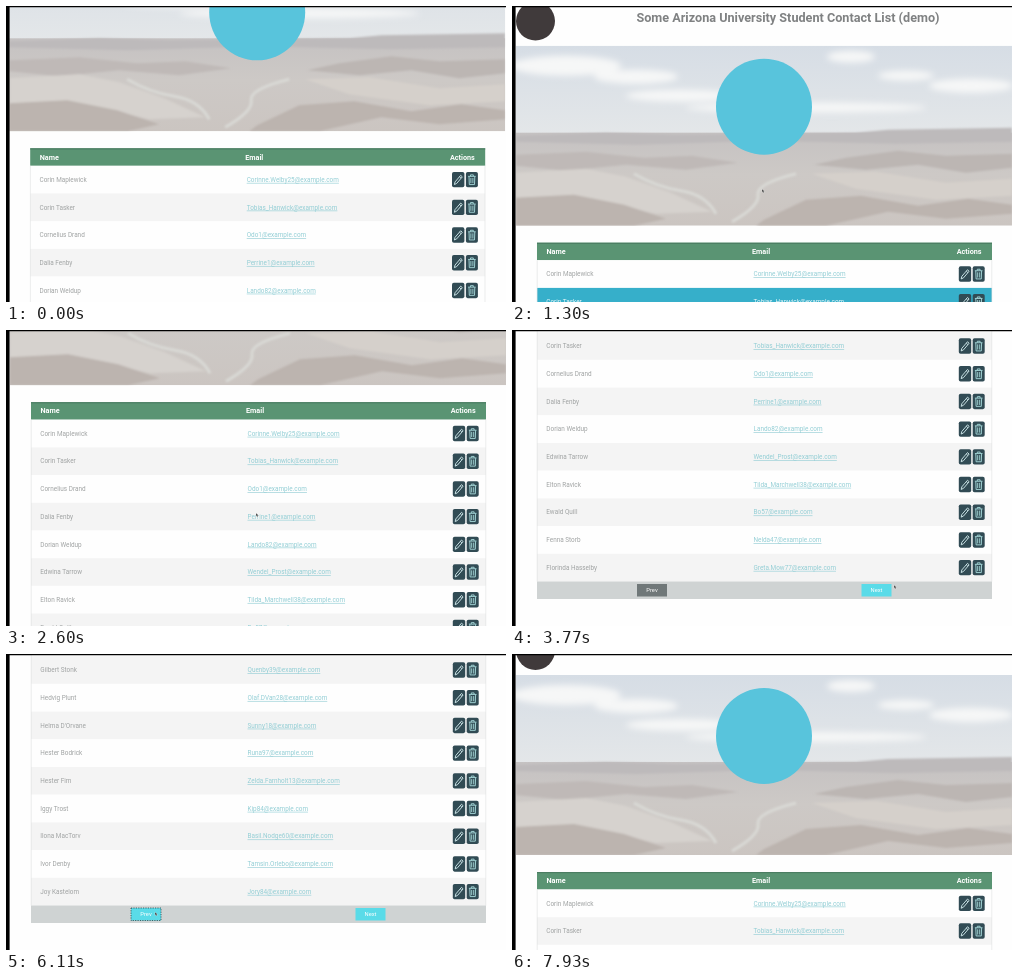
An HTML page for the animation above (8 s loop, 500x296 px).

```html
<!DOCTYPE html>
<html lang="en">
<head>
<meta charset="utf-8">
<title>Contact list</title>
<style>
  html, body { margin: 0; width: 100%; height: 100%; overflow: hidden; background: #fefefe; }
  svg { display: block; width: 100vw; height: 100vh; font-family: Roboto, sans-serif; }
  .title { font: 700 12.65px Roboto, sans-serif; fill: #7f8182; }
  .head { font: 700 7.25px Roboto, sans-serif; fill: #fff; }
  .row { font-size: 6.4px; fill: #a0a3a3; }
  .mail { fill: #93ced5; text-decoration: underline; }
  .hover > rect { fill: #36afca; }
  .hover > text { fill: #e6f6f9; }
  .button { font-size: 5.8px; fill: #fff; text-anchor: middle; }
</style>
</head>
<body>
<svg viewBox="0 0 500 296" preserveAspectRatio="none">
  <defs>
    <linearGradient id="sky" x2="0" y2="1">
      <stop stop-color="#d6dde5"/><stop offset="1" stop-color="#e4e7e9"/>
    </linearGradient>
    <linearGradient id="land" x2="0" y2="1">
      <stop stop-color="#c5c2c2"/><stop offset=".45" stop-color="#cdc9c6"/><stop offset="1" stop-color="#cbc5c1"/>
    </linearGradient>
    <filter id="soft" x="-20%" y="-50%" width="140%" height="200%"><feGaussianBlur stdDeviation="3"/></filter>
    <filter id="haze"><feGaussianBlur stdDeviation="1"/></filter>
    <clipPath id="frame"><path d="M0 0H496V180H0Z"/></clipPath>
    <g id="icons">
      <rect width="12.4" height="15.4" rx="1.8" fill="#314b54"/>
      <rect x="13.9" width="12" height="15.4" rx="1.8" fill="#314b54"/>
      <g fill="none" stroke="#d5eef0" stroke-width=".9">
        <path d="M2.4 12.6L3 10L8.7 3.4L10.3 4.9L4.7 11.5ZM7.5 4.8L9.1 6.3"/>
        <path stroke="#a9dcdd" d="M16.1 4.4H23.7M18.5 4.2V2.9H21.3V4.2M17 4.6L17.3 12.6H22.5L22.8 4.6M18.9 6V11.2M20.9 6V11.2"/>
      </g>
    </g>
  </defs>

  <rect width="500" height="296" fill="#fefefe"/>

  <!-- Everything scrolled hangs from the top edge of the table -->
  <g id="page">
    <circle cx="23.5" cy="-221.6" r="19.5" fill="#403a3b"/>
    <text class="title" x="276" y="-221.2" text-anchor="middle">Some Arizona University Student Contact List (demo)</text>

    <g transform="translate(4 -197)" clip-path="url(#frame)">
      <rect width="496" height="90" fill="url(#sky)"/>
      <g fill="#f6f7f7" filter="url(#soft)">
        <ellipse cx="50" cy="20" rx="55" ry="10"/>
        <ellipse cx="120" cy="31" rx="42" ry="7"/>
        <ellipse cx="165" cy="50" rx="55" ry="6"/>
        <ellipse cx="335" cy="11" rx="24" ry="6"/>
        <ellipse cx="390" cy="30" rx="28" ry="5"/>
        <ellipse cx="455" cy="40" rx="42" ry="7"/>
        <ellipse cx="290" cy="62" rx="120" ry="5"/>
      </g>
      <rect y="87" width="496" height="93" fill="url(#land)"/>
      <g filter="url(#haze)">
        <path fill="#bdbabb" d="M0 90L90 87L160 89L340 87L372 84L496 82V96L380 98L250 95L120 99L0 96Z"/>
        <path fill="#bfb9b7" d="M0 109L70 106L128 112L176 110L222 117L170 124L110 119L50 125L0 120Z"/>
        <path fill="#bcb6b3" d="M496 108L430 110L382 105L330 112L298 119L350 124L402 119L450 127L496 122Z"/>
        <path fill="#d6d2ce" d="M0 127L70 123L110 131L155 147L196 166L140 168L70 152L0 154Z"/>
        <path fill="#bcb4af" d="M0 152L58 149L108 159L150 173L118 180H0Z"/>
        <path fill="#d5d0cb" d="M296 128L360 126L430 137L496 133V150L420 154L340 143Z"/>
        <path fill="#bcb4af" d="M248 174L290 154L345 150L402 160L452 153L496 159V168L430 173L372 166L310 180H240Z"/>
        <path fill="none" stroke="#d9d9d5" stroke-width="3" d="M118 128Q140 141 165 145T200 168M280 128Q240 138 242 149T216 176"/>
      </g>
    </g>
    <circle cx="252" cy="-136" r="48" fill="#58c4dc"/>

    <rect x="25" width="455" height="17.5" fill="#5a9473"/>
    <rect x="25" width="455" height="1.2" fill="#4b7d62"/>
    <g class="head">
      <text x="34.5" y="11.3">Name</text>
      <text x="240" y="11.3">Email</text>
      <text x="444.7" y="11.3">Actions</text>
    </g>
    <g id="lists"></g>
    <path d="M25.2 17.5V294.5M479.8 17.5V294.5" stroke="#dfe1e1" stroke-width=".6"/>
    <rect x="25" y="294.5" width="455" height="17.5" fill="#cfd3d3"/>
    <g class="button">
      <rect id="prev" x="125" y="297" width="30" height="12.5"/>
      <rect x="349.5" y="297" width="30" height="12.5" fill="#5adbe8"/>
      <text x="140" y="305.3">Prev</text>
      <text x="364.5" y="305.3">Next</text>
      <rect id="focus" x="125" y="297" width="30" height="12.5" fill="none" stroke="#26464b" stroke-width=".8" stroke-dasharray="1.2 1.2"/>
    </g>
  </g>

  <path id="cursor" d="M0 0V3.4L.9 2.7L1.5 3.9L2.1 3.6L1.6 2.5H2.6Z" fill="#333" stroke="#fff" stroke-width=".3"/>
  <path d="M0 0H500V1.2H3.6V296H0Z"/>
</svg>
<script>
const LOOP = 8000, STEP = 130, ROW = 27.7;
const $ = id => document.getElementById(id);

// name, mailbox
const people = [
  "Corin Maplewick,Corinne.Welby25", "Corin Tasker,Tobias_Hanwick", "Cornelius Drand,Odo1",
  "Dalia Fenby,Perrine1", "Dorian Weldup,Lando82", "Edwina Tarrow,Wendel_Prost",
  "Elton Ravick,Tilda_Marchwell38", "Ewald Quill,Bo57", "Fenna Storb,Nelda47",
  "Florinda Hasselby,Greta.Mow77",
  "Gerda Wimple,Lorin12", "Gilbert Stonk,Quenby39", "Hedvig Plunt,Olaf.DVan28",
  "Helma D'Orvane,Sunny18", "Hester Bodrick,Runa97", "Hester Fim,Zelda.Farnholt13",
  "Iggy Trost,Kip84", "Ilona MacTorv,Basil.Nodge60", "Ivor Denby,Tamsin.Orlebo",
  "Joy Kastelom,Jory84",
  "Judith Parvel,Mirka_Dun4", "Kasimir Hobbin,Ottoline61", "Kerstin Vade,Pella.Rusk",
  "Lambert Ossing,Tove19", "Leopold Crimmel,Ursel_Banting7", "Linnea Fosk,Hob33",
  "Lucinda Tarbeck,Nils.Wexby52", "Magnus Pell,Imke90", "Marit Sundby,Jorun_Teek",
  "Merle Hantwick,Sander28"
].map(s => s.split(","));

const row = ([name, box], i) => {
  const y = 17.5 + i % 10 * ROW, base = y + ROW / 2 + 2.2;
  return `<g class="row"><rect x="25" y="${y}" width="455" height="${ROW}" fill="${i % 2 ? "#f4f4f4" : "#fefefe"}"/>
    <text x="34.3" y="${base}">${name}</text>
    <text class="mail" x="241.5" y="${base}">${box}@example.com</text>
    <use href="#icons" x="446.8" y="${y + ROW / 2 - 7.7}"/></g>`;
};
$("lists").innerHTML = [0, 1, 2].map(p =>
  `<g>${people.slice(p * 10, p * 10 + 10).map(row).join("")}</g>`).join("");
const lists = [...$("lists").children];
const hoverRow = lists[0].children[1];

// keys: time, x, y
const scroll = [[910, -.8, 142.3], [1430, 0, 238], [2340, 0, 238], [3380, 0, -43], [6890, 0, -43], [7840, 0, 218]];
const pointer = [[2860, 250, 183], [3380, 382, 255], [3770, 382, 255],
  [4030, 366, 259], [5330, 366, 259], [5980, 149, 258]];
// time, page
const pages = [[0, 0], [4160, 1], [5200, 2], [5980, 1], [6760, 0]];

const linear = u => u;
const glide = u => 1 - (1 - u) ** 3.1;

function at(keys, t, ease) {
  const i = keys.findIndex(k => k[0] > t);
  if (i < 0) return keys[keys.length - 1].slice(1);
  if (!i) return keys[0].slice(1);
  const a = keys[i - 1], b = keys[i], u = ease((t - a[0]) / (b[0] - a[0]));
  return a.slice(1).map((v, j) => v + (b[j + 1] - v) * u);
}
const show = (el, on) => el.setAttribute("display", on ? "inline" : "none");
const move = (el, xy) => el.setAttribute("transform", `translate(${xy})`);

function draw(now) {
  const t = Math.floor(now % LOOP / STEP) * STEP;
  const page = pages.filter(p => p[0] <= t).pop()[1];
  move($("page"), at(scroll, t, glide));
  move($("cursor"), at(pointer, t, linear));
  lists.forEach((list, i) => show(list, i === page));
  // The hover set before scrolling stays until the scroll ends
  hoverRow.classList.toggle("hover", t >= 650 && t < 1430);
  $("prev").setAttribute("fill", page ? "#5adbe8" : "#707879");
  show($("focus"), t >= 5980 && t < 6890);
  show($("cursor"), t >= 650 && t < 7800);
}

const start = performance.now();
function tick() {
  draw(performance.now() - start);
  requestAnimationFrame(tick);
}
tick();
</script>
</body>
</html>
```
